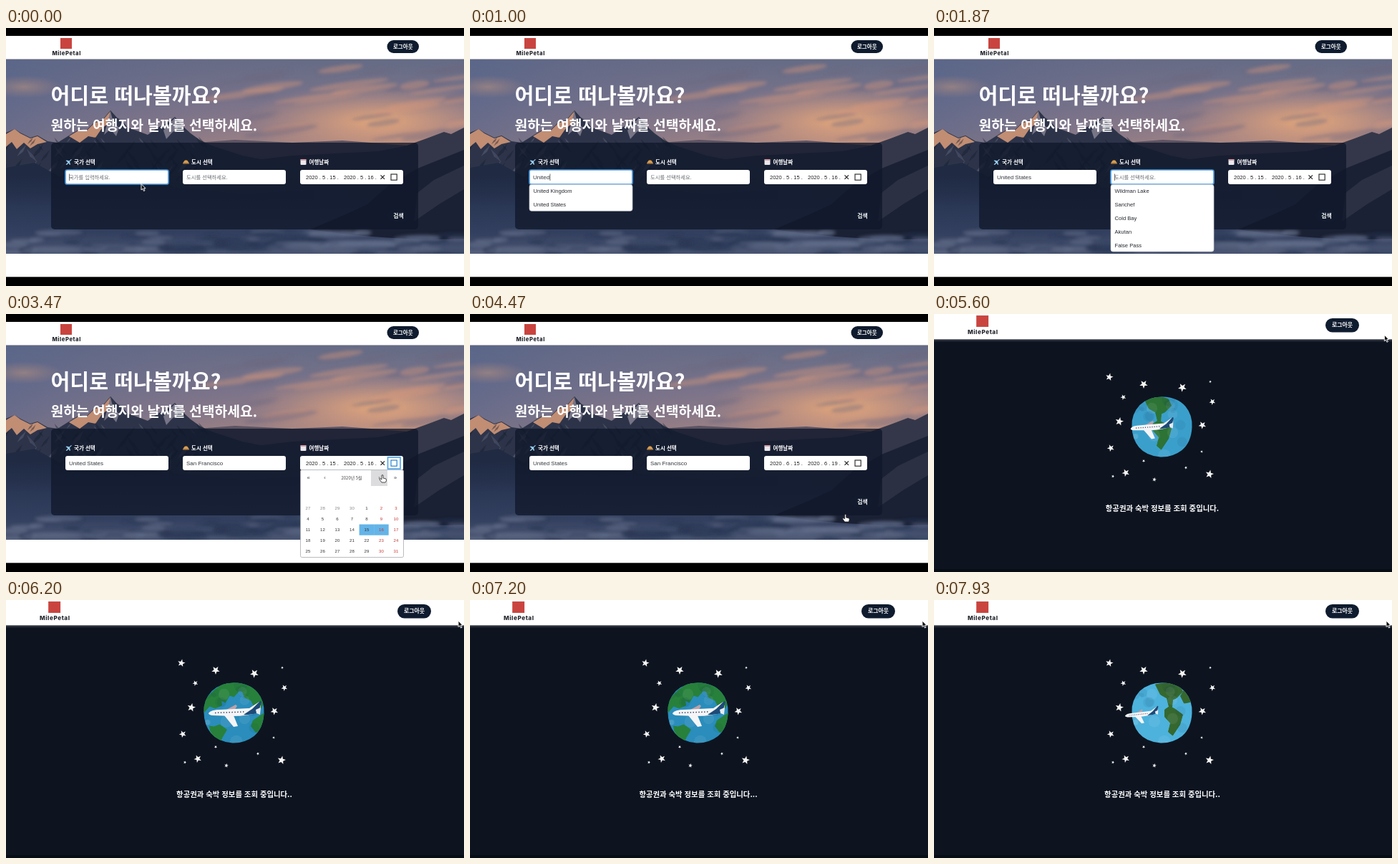
These frames come from a looping animation (640x360 px, 8 s). An HTML page:

```html
<!DOCTYPE html>
<html lang="ko">
<head>
<meta charset="utf-8">
<title>Trip search</title>
<style>
html, body { margin: 0; width: 100%; height: 100%; overflow: hidden; background: #000; }
svg { display: block; width: 100vw; height: 100vh; }
text { white-space: pre; }
.ko { font-family: "Noto Sans CJK KR", "Noto Sans CJK", sans-serif; }
.en { font-family: "Liberation Sans", sans-serif; }
.logo { font-family: Inter, sans-serif; }
</style>
</head>
<body>
<svg viewBox="0 0 640 360" xmlns="http://www.w3.org/2000/svg">
  <defs>
    <linearGradient id="sky" x2="0" y2="1">
      <stop offset="0" stop-color="#646b85"/><stop offset=".2" stop-color="#7a748b"/>
      <stop offset=".36" stop-color="#967f89"/><stop offset=".46" stop-color="#b08a80"/>
    </linearGradient>
    <linearGradient id="cool">
      <stop offset="0" stop-color="#56648a" stop-opacity=".7"/><stop offset=".5" stop-color="#6b6a86" stop-opacity=".25"/>
      <stop offset=".8" stop-color="#6b6a86" stop-opacity="0"/>
    </linearGradient>
    <radialGradient id="glow">
      <stop offset="0" stop-color="#f2ae78" stop-opacity=".85"/><stop offset="1" stop-color="#e09a78" stop-opacity="0"/>
    </radialGradient>
    <linearGradient id="sea" x2="0" y2="1">
      <stop offset="0" stop-color="#26324e" stop-opacity="0"/><stop offset=".4" stop-color="#2a3755"/>
      <stop offset=".75" stop-color="#34405f"/><stop offset="1" stop-color="#4a5673"/>
    </linearGradient>
    <clipPath id="hero"><path d="M0 43H640V315H0Z"/></clipPath>
    <clipPath id="globe"><path d="M276 157Q275 140 287 127Q300 115 319 115.500Q340 116 351 129Q361 141 360 158Q359 179 346 190Q333 200 316 199.500Q296 198 286 186Q276 174 276 157Z"/></clipPath>
    <filter id="soft"><feGaussianBlur stdDeviation="2"/></filter>
  </defs>
  <g id="home"></g>
  <g id="wait"></g>
  <g id="live"></g>
</svg>
<script>
const LOOP = 8000, CUT = 4650, BRAND = 'MilePetal';
const el = id => document.getElementById(id);
const home = el('home'), wait = el('wait'), live = el('live');

const box = (x, y, w, h, fill, more = '') => `<rect x="${x}" y="${y}" width="${w}" height="${h}" fill="${fill}" ${more}/>`;
const path = (d, fill, more = '') => `<path d="${d}" fill="${fill}" ${more}/>`;
const line = (d, color, width = 1) => path(d, 'none', `stroke="${color}" stroke-width="${width}"`);
const oval = (x, y, rx, ry, fill, more = '') => `<ellipse cx="${x}" cy="${y}" rx="${rx}" ry="${ry}" fill="${fill}" ${more}/>`;
const text = (cls, x, y, size, fill, str, more = '') =>
  `<text class="${cls}" x="${x}" y="${y}" font-size="${size}" fill="${fill}" ${more}>${str}</text>`;
const bold = 'font-weight="700"', mid = 'text-anchor="middle"', boldMid = bold + ' ' + mid;

function random(seed) {
  return () => (seed = (seed * 16807) % 2147483647) / 2147483647;
}

function header(logoX, logoY, k, [x, y, w, h]) {
  return box(logoX + 11 * k, logoY - 24 * k, 16 * k, 15 * k, '#c9443f')
    + text('logo', logoX - 0.5, logoY, 7.7 * k, '#22252c', BRAND, 'font-weight="800" letter-spacing=".55"')
    + box(x, y, w, h, '#0f1b2e', `rx="${h / 2}"`)
    + text('ko', x + w / 2, y + h / 2 + 2.7, 7.5 * k, '#fff', '로그아웃', boldMid);
}

function landscape() {
  const rnd = random(41);
  let clouds = '', rocks = '', mist = '';
  for (let i = 0; i < 34; i++) {
    const x = 330 + rnd() * 330, y = 55 + rnd() * 95;
    clouds += oval(x, y, 15 + rnd() * 45, 1.5 + rnd() * 4, i % 2 ? '#6d6680' : '#d9987c', `opacity=".4" transform="rotate(-8 ${x} ${y})"`);
  }
  for (let i = 0; i < 110; i++) {
    const x = rnd() * 270, y = 150 + rnd() * 65, s = 4 + rnd() * 9, side = rnd() < 0.5 ? -1 : 1;
    rocks += path(`M${x} ${y}l${side * s} ${s}l${side * s * 0.5} ${s * 0.9}l${-side * s} ${-s * 0.8}Z`, i % 3 ? '#171e31' : '#656a80', 'opacity=".45"');
  }
  for (let i = 0; i < 70; i++) {
    mist += oval(rnd() * 640, 284 + rnd() * 34, 10 + rnd() * 32, 1.5 + rnd() * 4, i % 2 ? '#69748f' : '#253250', 'opacity=".5"');
  }
  return `<g clip-path="url(#hero)">`
    + box(0, 43, 640, 272, 'url(#sky)') + box(0, 43, 640, 272, 'url(#cool)')
    + oval(520, 130, 190, 52, 'url(#glow)') + oval(25, 82, 55, 16, 'url(#glow)', 'opacity=".4"')
    + `<g filter="url(#soft)">${clouds}</g>`
    + path('M240 162L320 156L400 160L470 157L560 164L640 150V315H240Z', '#5c5363')
    + path('M300 190L400 178L520 172L560 164L588 154L612 145L622 148L640 139V315H300Z', '#343749')
    + path('M0 146L12 141L20 146L34 153L44 150L58 158L72 160L88 150L103 141L112 143L124 131L134 129L146 115L155 125L163 130L170 139L182 143L198 149L214 138L226 132L236 124L246 136L258 147L272 157L290 165L330 178L400 192L480 204V315H0Z', '#2d344a')
    + path('M0 148L12 141L20 147L34 154L44 151L57 159L44 162L34 168L25 160L15 169L8 159L0 166ZM88 151L103 142L112 144L124 132L134 130L146 116L143 133L134 140L125 153L115 151L103 160Z', '#c18d73')
    + path('M146 116L150 132L158 139L154 151L146 141L137 149ZM236 125L240 140L232 146L224 155L220 143Z', '#777486')
    + rocks
    + path('M0 195L40 188L90 216L150 210L230 222L330 232L430 226V315H0Z', '#202a43')
    + box(0, 205, 640, 110, 'url(#sea)')
    + path('M425 281L470 262L505 246L535 219L575 196L605 184L640 170V294Q540 298 425 281Z', '#1b2134')
    + path('M575 230L598 212L640 192V225L605 246L570 270Z', '#2b3043')
    + `<g filter="url(#soft)">${mist}</g></g>`;
}

function label(x, str) {
  return text('ko', x + 12, 190, 7.5, '#fff', str, bold);
}

home.innerHTML = box(0, 0, 640, 360, '#000') + box(0, 11, 640, 336.3, '#fff')
  + header(65, 38, 1, [532.5, 17, 44.5, 18]) + landscape() + line('M0 43.500H640', '#a8a9b2')
  + text('ko', 62.5, 104.500, 29.2, '#fff', '어디로 떠나볼까요?', bold)
  + text('ko', 62.5, 143, 19.3, '#fff', '원하는 여행지와 날짜를 선택하세요.', bold)
  + box(63, 160, 513, 121, '#10182a', 'rx="5" opacity=".77"')
  + label(83, '국가 선택') + label(247, '도시 선택') + label(411.5, '여행날짜')
  + path('M83.500 190.500L86.500 187.500L83.500 185L85 184.500L88.500 185.500L91 183Q92 182.500 91.500 184L89 186.500L90 190.500L89 191L87.500 188.500L85 191Z', '#9ad2f2')
  + path('M247 189L248 187L250 184.500H253L255 187L256 189Z', '#d9a04c') + box(247, 188.500, 9, 1.6, '#79583c', 'rx=".8"')
  + box(411.5, 183, 8, 8, '#e9e9ee', 'rx="1"') + box(411.5, 183, 8, 2, '#d99aa0', 'rx="1"')
  + box(532, 253, 31, 18, '#121b2d', 'rx="9"')
  + text('ko', 548.5, 265, 7.8, '#fff', '검색', boldMid)
  + [83, 247, 411].map(x => box(x, 198, 144, 20, '#fff', 'rx="3"')).join('');

function star(x, y, r) {
  let d = '';
  for (let i = 0; i < 10; i++) {
    const a = i * Math.PI / 5 - 1.35 + x % 0.7, q = i % 2 ? r * 0.42 : r;
    d += (i ? 'L' : 'M') + (x + q * Math.cos(a)).toFixed(1) + ' ' + (y + q * Math.sin(a)).toFixed(1);
  }
  return path(d + 'Z', '#f6f6f4');
}

const stars = [
  [245, 88, 5.5], [293, 98, 6], [347, 102.5, 6.2], [386, 94.5, 2], [389, 122.5, 4.5], [264.5, 116, 4],
  [259, 150, 6], [375, 155, 5.5], [247, 187, 5.2], [374, 192, 2], [293, 205, 2.2], [268, 221.5, 5.5],
  [352, 214.5, 2.2], [250, 226.5, 2.2], [308, 231, 3], [385, 223.5, 6]
];

wait.innerHTML = box(0, 0, 640, 360, '#0d1420') + box(0, 356, 640, 4, '#080d15')
  + box(0, 0, 640, 35, '#fff') + box(0, 35, 640, 1.5, '#70747d') + box(0, 36.5, 640, 2, '#202733')
  + header(47.5, 27.5, 1.06, [547, 6, 47, 19.5]) + stars.map(s => star(...s)).join('');

const americas = 'M309 118Q330 113 343 119L347 128L338 137L333 139L332 150L336 152L347 160L343 174L333 189L327 184L330 172L322 163L322 153L328 149L325 137L316 132Z';
const poses = [
  { sea: '#2a8dbb', land: '#27813a', plane: [320, 157, 1, 0],
    d: 'M275 145Q288 122 312 114L334 116L330 128L326 126L318 135L312 133L306 143L300 140L301 147L292 151L284 148L276 157ZM336 115Q353 120 360 142L356 151L346 148L342 140L333 136L330 128ZM290 177L298 174L308 181L302 191L298 199Q285 190 284 176ZM345 168L360 158Q358 180 349 185L342 176Z' },
  { sea: '#3b9fcb', land: '#2c7335', plane: [305, 158, 0.82, -2], shift: -16, d: americas },
  { sea: '#4db2dc', land: '#35682f', plane: [290.5, 159.5, 0.64, -4],
    d: americas + 'M350 124Q358 133 360 142L349 144L344 134Z' },
  { sea: '#2187bb', land: '#178421', grow: 1.025,
    d: 'M278 153L294 150L303 157L316 162L313 172L306 185L298 186L292 176L283 172ZM286 138L300 125L312 115Q345 115 358 140L357 150L348 159L338 164L330 158L322 152L312 153L304 148L292 149L282 146ZM329 177L340 168L351 170L346 181L341 190L332 186Z' }
];

function plane([x, y, k, tilt]) {
  return `<g transform="translate(${x} ${y}) rotate(${tilt}) scale(${k}) translate(-320 -157)">`
    + path('M308 153L321 146L323 148L319 154Z', '#b9a2a9')
    + path('M283 158Q286 153 300 153L340 151L354 142L356 148L354 156Q340 162 315 162L288 161Q283 160 283 158Z', '#f5f5f7')
    + path('M332 160L344 152L355 141L357 142L353 157Q343 161 332 160Z', '#1d4a78')
    + path('M349 153L356 150L355 160L350 158Z', '#e7ebf0')
    + path('M305 161L318 161L324 176L318 177Z', '#f5f5f7')
    + path('M292 157.500L334 156', 'none', 'stroke="#3a4660" stroke-width="1.5" stroke-dasharray="1.5 2.4"') + '</g>';
}

function earth(p) {
  const rnd = random(77);
  let blots = '';
  for (let i = 0; i < 22; i++) {
    const r = 3 + rnd() * 6;
    blots += oval(280 + rnd() * 78, 118 + rnd() * 80, r, r, i % 2 ? '#fff' : '#0b3550', 'opacity=".07"');
  }
  const k = p.grow || 1;
  return `<g transform="translate(318.500 157.500) scale(${k}) translate(-318 -157.500)"><g clip-path="url(#globe)">`
    + box(270, 110, 96, 96, p.sea) + path(p.d, p.land, `transform="translate(${p.shift || 0})" stroke="${p.land}" stroke-linejoin="round"`)
    + blots + '</g></g>' + (p.plane ? plane(p.plane) : '');
}
const globes = poses.map(earth);

const countries = ['Uganda', 'Ukraine', 'United Kingdom', 'United States', 'Uruguay'];
const cities = ['Wildman Lake', 'Sarichef', 'Cold Bay', 'Akutan', 'False Pass', 'San Diego', 'San Francisco', 'San Jose'];
const typed = (str, t, start, step) => str.slice(0, Math.max(0, Math.floor((t - start) / step) + 1));

function field(x, value, hint, focus) {
  return (focus ? box(x, 198, 144, 20, '#fff', 'rx="2.5" stroke="#4a9be0" stroke-width="1.7"') : '')
    + (value ? text('en', x + 5, 211, 8, '#33363c', value) : text('ko', x + 5, 211, 7.3, '#6b6e74', hint))
    + (focus ? line(`M${x + 5.5 + (value ? value.length * 3.9 : 0)} 203.500V213`, '#333', 0.7) : '');
}

function menu(x, items) {
  return box(x, 218.5, 144, items.length * 18.9 - 1, '#fff', 'rx="3" stroke="#c8c9ce" stroke-width=".7"')
    + items.map((s, i) => text('en', x + 5.5, 230.3 + i * 18.9, 7.6, '#26292f', s)).join('');
}

function calendar(month, from, to, hover) {
  const first = month === 5 ? 4 : 0, count = month === 5 ? 31 : 30, before = month === 5 ? 30 : 31;
  let out = box(411.5, 217.5, 144, 122, '#fff', 'stroke="#a9abb0" stroke-width=".8" rx="2"');
  if (hover) out += box(510, 218, 23, 22, '#dcdcde');
  ['«', '‹', '›', '»'].forEach((s, i) => out += text('en', [422.5, 445.5, 521.5, 544][i], 231, 7.5, '#444', s, mid));
  out += text('ko', 483, 231, 5.9, '#444', `2020년 ${month}월`, mid);
  for (let i = 0; i < 35; i++) {
    const n = i - first + 1, inside = n > 0 && n <= count;
    const day = n < 1 ? n + before : n > count ? n - count : n;
    const x = 422 + i % 7 * 20.5, y = 273.2 + Math.floor(i / 7) * 15;
    if (inside && n >= from && n <= to) out += box(x - 10.4, y - 9.7, 20.6, 15.2, '#63b4e8');
    out += text('en', x, y, 6.1, !inside ? '#85878b' : i % 7 > 4 ? '#c23a35' : '#333', day, mid);
  }
  return out;
}

function dates(a, b, active) {
  return text('en', 419, 211, 7.5, '#222', a) + text('en', 472, 211, 7.5, '#222', b)
    + line('M523.500 205.300L529 210.800M529 205.300L523.500 210.800', '#222', 1.2)
    + box(538, 204, 8.2, 8.2, 'none', `stroke="${active ? '#1677c8' : '#222'}" stroke-width="1.1"`)
    + (active ? box(533.5, 200, 17.5, 16, 'none', 'stroke="#55a7e8" stroke-width="1.7"') : '');
}

const track = [
  [0, 189, 217.5], [1100, 189, 217.5], [1350, 140, 225], [1450, 140, 225], [1680, 300, 208], [2300, 300, 208], [2450, 298, 226],
  [2560, 298, 226], [2900, 541, 207], [3050, 541, 207], [3350, 526, 225], [3640, 526, 225], [3950, 422, 298],
  [4050, 422, 298], [4270, 504, 298], [4400, 504, 298], [4550, 549, 259], [4650, 549, 259], [5000, 569, 36],
  [5250, 569, 36], [5650, 632, 29], [LOOP, 632, 29]
];
const unseen = [[400, 1150], [1760, 2300]];

function cursor(t) {
  if (unseen.some(([a, b]) => t >= a && t < b)) return '';
  const i = track.findIndex(k => k[0] > t);
  const [t0, x0, y0] = track[i - 1], [t1, x1, y1] = track[i];
  const u = (t - t0) / (t1 - t0), e = u * u * (3 - 2 * u);
  const x = x0 + (x1 - x0) * e, y = y0 + (y1 - y0) * e;
  const hand = t > 3250 && t < CUT;
  const shape = hand
    ? path('M-1 0Q0-1 1 0V4L5 5Q6 6 5 9L4 10H-1L-4 6Q-4 4-2 5L-1 6Z', '#fff', 'stroke="#222" stroke-width=".8"')
    : path('M0 0V8.500L2 6.700L3.500 10L5 9.300L3.600 6.200H6Z', '#111', 'stroke="#fff" stroke-width=".9"');
  return `<g transform="translate(${x.toFixed(2)} ${y.toFixed(2)})">${shape}</g>`;
}

function search(t) {
  const country = t < 1420 ? typed('United', t, 450, 110) : 'United States';
  const city = t < 2520 ? typed('San F', t, 2000, 75) : 'San Francisco';
  const inCity = t >= 1700 && t < 2520;
  const month = t < 3620 ? 5 : 6, start = t >= 4000, done = t >= 4390;
  const open = t >= 3000 && !done;
  const day = n => `2020 . ${done ? 6 : 5} . ${n} .`;
  let out = field(83, country, '국가를 입력하세요.', t < 1420) + field(247, city, '도시를 선택하세요.', inCity)
    + dates(day(15), day(done ? 19 : 16), open);
  if (country && t < 1420) out += menu(83, countries.filter(s => s.startsWith(country)));
  if (inCity) out += menu(247, cities.filter(s => s.startsWith(city)).slice(0, 5));
  if (open) {
    const last = 15 + Math.max(0, Math.min(4, Math.floor((t - 4050) / 50)));
    out += month === 5 ? calendar(5, 15, 16, t > 3260) : calendar(6, start ? 15 : 99, start ? last : 0, t < 3700);
  }
  return out;
}

function loading(t) {
  const dots = Math.floor((t - 3670) / 600) % 3 + 1;
  const pose = Math.floor(((t - 5190 + 2000) % 1000) / 250);
  return globes[pose] + text('ko', 319, 275.3, 10.4, '#fff', '항공권과 숙박 정보를 조회 중입니다' + '.'.repeat(dots), boldMid);
}

let shown = '';
function draw(t) {
  const first = t < CUT;
  home.style.display = first ? '' : 'none';
  wait.style.display = first ? 'none' : '';
  const next = (first ? search(t) : loading(t)) + cursor(t);
  if (next !== shown) live.innerHTML = shown = next;
}

const began = performance.now();
function tick() {
  draw((performance.now() - began) % LOOP);
  requestAnimationFrame(tick);
}
tick();
</script>
</body>
</html>
```
